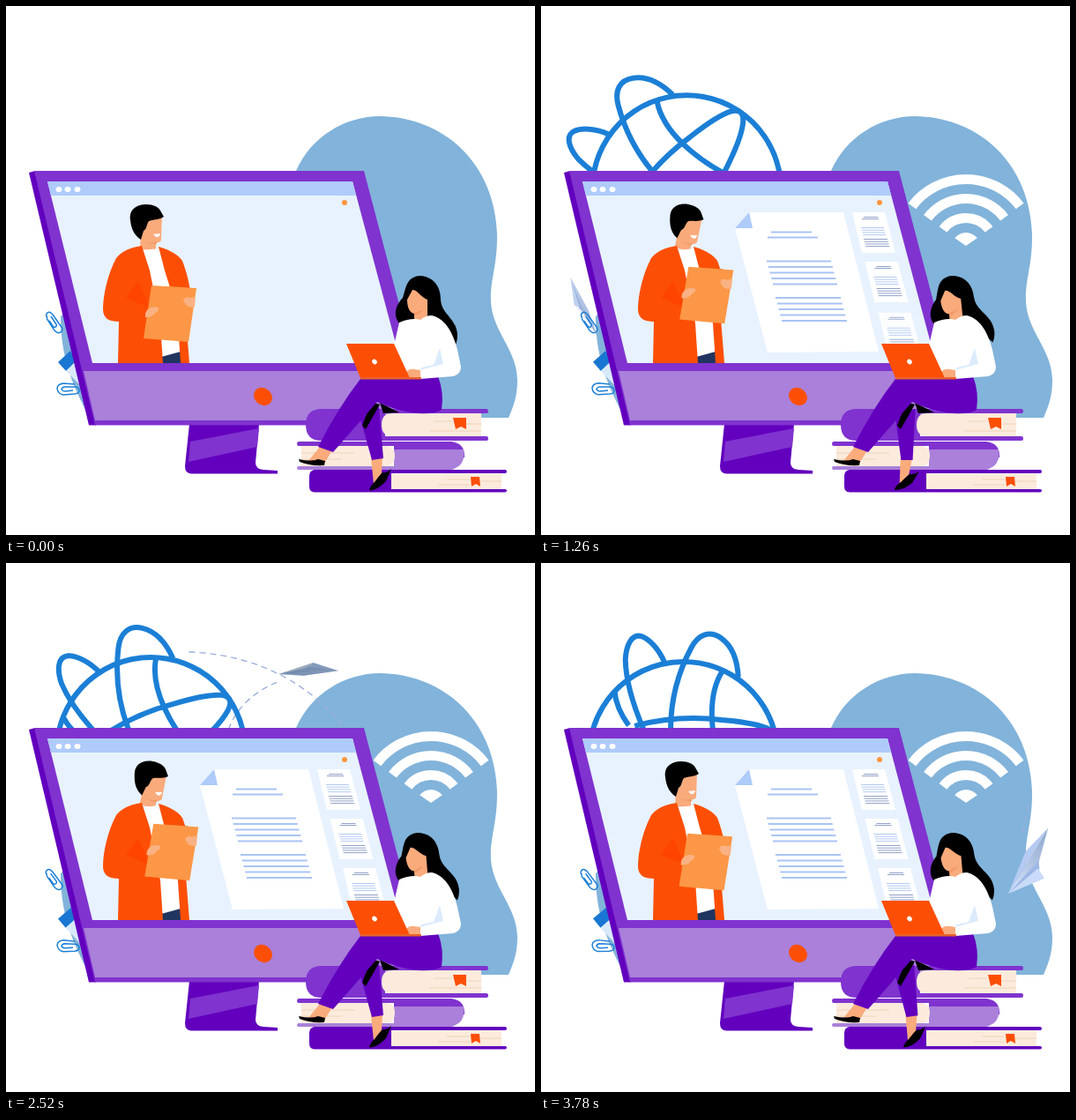
Animation of 600 by 600 pixels, one loop 3920 ms. Source, as an HTML page:

```html
<!DOCTYPE html>
<html lang="en">
<head>
<meta charset="utf-8">
<title>Online lesson</title>
<style>
  html, body { margin: 0; width: 100%; height: 100%; overflow: hidden; background: #fff; }
  svg { display: block; width: 100vw; height: 100vh; }
  .violet { fill: #8033cf; }
  .deep { fill: #6200be; }
  .lilac { fill: #aa80da; }
  .orange { fill: #fc4f05; }
  .skin { fill: #f9ab7c; }
  .cream { fill: #fcebdc; }
  .white { fill: #fff; }
  .pale { fill: #e8f2fe; }
  .line { fill: none; stroke: #1b7fd6; }
</style>
</head>
<body>
<svg viewBox="0 0 600 600">
  <defs>
    <clipPath id="sky"><rect width="600" height="188"/></clipPath>
    <clipPath id="glass"><path d="M51 215H397L448 405H98Z"/></clipPath>
    <linearGradient id="wing" x1="0" x2="1">
      <stop offset="0" stop-color="#8ba5cb"/><stop offset="1" stop-color="#d6e4fb"/>
    </linearGradient>
  </defs>

  <path fill="#82b3da" d="M329 187C346 148 385 125 424 125C500 126 556 182 557 262C557 296 549 310 550 336C552 370 580 390 580 425C580 445 574 457 570 467H95C75 430 62 398 62 352L120 300L329 300Z"/>

  <path id="trail" fill="none" stroke="#9dafdc" stroke-width="1.4" d="M62 362C30 310 12 260 12 218C12 180 35 145 62 133C90 118 150 100 210 101C290 105 350 140 390 195C410 230 240 260 252 190C262 160 290 138 325 130C350 122 375 122 400 122C470 122 530 140 552 172C566 195 562 225 557 247C552 285 540 340 530 375"/>
  <g id="plane">
    <path fill="#b4caf2" d="M0 0L-87 0L-51 8Z"/>
    <path fill="url(#wing)" d="M0 0L-87 0L-42 -13Z"/>
    <path fill="#9db7e6" d="M0 0L-50 -10L-42 -16Z"/>
    <path fill="#c9dbf9" d="M0 0L-42 -14L-36 -26Z"/>
    <path id="shade" fill="#56708f" d="M0 0L-36 -26L-87 0L-51 8Z"/>
  </g>

  <g clip-path="url(#sky)">
    <g id="globe" class="line" stroke-width="6">
      <circle cx="165" cy="211.500" r="107"/>
      <path d="M172 103C160 85 146 76 132 75C117 74 108 84 109 102C111 140 122 170 140 198"/>
      <path d="M92 132C78 122 63 118 54 120C43 123 44 137 52 152C66 174 88 193 112 210"/>
      <path d="M153 106C152 140 180 180 226 215"/>
      <path d="M100 211C125 185 150 168 181 154C205 142 222 136 233 135C254 134 247 158 206 207"/>
      <path d="M60 189Q72 205 94 214"/>
    </g>
  </g>

  <g id="clipA"><path class="line" stroke-width="1.5" d="M46 354L55 368Q60 373 63 369Q65 366 62 363L53 350Q49 345 46 349Q45 351 47 354M51 352L57 361Q58 363 56 364Q54 365 53 363L49 357"/></g>
  <g id="clipB"><path class="line" stroke-width="1.5" d="M78 429L65 428Q58 429 58 434Q59 440 65 441L78 440Q84 439 83 435Q82 432 78 432L66 432Q63 433 63 435Q64 437 67 437L76 436"/></g>
  <g id="box">
    <path fill="#1976d2" d="M59 404L73 391L80 404L68 414Z"/>
    <path fill="#d9eafb" d="M68 414L78 404L86 432Z"/>
  </g>

  <g id="wifi" fill="none" stroke="#fff" stroke-width="11"></g>

  <!-- monitor -->
  <path class="deep" d="M208 474L203 522Q203 530 210 530.500H308V527L292 526Q283 525 283 518L287 474Z"/>
  <path class="violet" d="M209 494L287 479L285 500L207 517Z"/>
  <path class="deep" d="M26 189L33 187L102 475.500H94Z"/>
  <path class="violet" d="M32 187H406L482 475.500H101Z"/>
  <path class="lilac" d="M88 414H461L475 470H101Z"/>
  <path class="pale" d="M47 199H393L448 405H98Z"/>
  <path fill="#aecbfa" d="M47 199H393L397 215H51Z"/>
  <g class="white">
    <ellipse cx="60" cy="208" rx="3.5" ry="3"/><ellipse cx="70" cy="208" rx="3.5" ry="3"/><ellipse cx="81" cy="208" rx="3.5" ry="3"/>
  </g>
  <circle cx="384" cy="223" r="3" fill="#fb953e"/>
  <ellipse class="orange" cx="291.5" cy="443" rx="11" ry="9.5" transform="rotate(40 291.5 443)"/>

  <g clip-path="url(#glass)">
    <g id="sheet">
      <path class="white" d="M220 252L236 234H343L383 392L257 393Z"/>
      <path fill="#aecbfa" d="M220 252L236 234L240 252Z"/>
      <path id="text" fill="none" stroke="#a9c4f3" stroke-width="2"/>
    </g>
    <g id="thumbs"></g>
  </g>

  <!-- teacher -->
  <g id="man">
    <g id="manHead">
      <path class="skin" d="M154 238H177L176 266Q174 269 170 268V277L152 276Z"/>
      <path fill="#f39a68" d="M158 267Q165 270 171 267V270Q164 271 158 267Z"/>
      <path d="M141 243C139 232 147 225 159 225C167 225 173 228 175 232L179 239C173 243 166 242 162 244C159 248 160 253 156 255L153 265C145 260 142 252 141 243Z"/>
      <path class="white" d="M167 259L175 258Q174 263 170 262Z"/>
    </g>
    <path class="white" d="M156 277L174 275L190 320L198 398L176 398L160 330Z"/>
    <path fill="#20355f" d="M176 398L198 392L199 405H177Z"/>
    <path class="orange" d="M154 272C138 274 130 280 125 286C115 305 110 328 110 344C110 355 118 358 128 358L127 405H178L175 360L163 300Z"/>
    <path class="orange" d="M173 273C187 277 196 283 200 289C205 302 209 318 209 327L204 355L208 405H198L194 345L180 300Z"/>
    <path fill="#ff4400" d="M150 312L136 331L162 342L158 330Z"/>
    <g id="board">
      <path fill="#d9722b" d="M178 318L204 319L203 321H178Z"/>
      <path fill="#fb9746" d="M165 317L216 320L207 381L156 377Z"/>
      <path fill="#fab183" d="M158 349C160 342 167 340 173 342Q174 346 169 348Q167 353 158 353Z"/>
      <path fill="#fab183" d="M201 334Q203 329 209 331L215 330L214 341Q208 343 204 339Z"/>
    </g>
  </g>

  <!-- books -->
  <path class="violet" d="M358 457H545Q547 457 547 460Q547 462 545 462H430V488H545Q547 488 547 491Q547 493 545 493H358Q340 493 340 475Q340 457 358 457Z"/>
  <path class="cream" d="M438 462H539V488H438Q426 488 426 475Q426 462 438 462Z"/>
  <path class="orange" d="M507 467H522V480L516 477L510 480Z"/>
  <path fill="none" stroke="#efd3ba" d="M485 471H506M522 474H539M480 482H539"/>
  <path class="violet" d="M332 494H505Q520 496 520 510V512H440V499H332Q330 499 330 496.500Q330 494 332 494Z"/>
  <path class="lilac" d="M440 503H519Q522 522 505 526H332Q330 526 330 524Q330 522 332 522H440Z"/>
  <path class="cream" d="M335 499H432Q441 500 441 510.500Q441 521 432 522H335Z"/>
  <path fill="none" stroke="#efd3ba" d="M335 507H395M335 514H380"/>
  <path class="deep" d="M350 526H566Q568 526 568 528Q568 530 566 530H437V548H566Q568 548 568 549.500Q568 551.500 566 551.500H350Q344 551 344 545V533Q344 527 350 526Z"/>
  <path class="cream" d="M437 530.500H562V548H437Z"/>
  <path class="orange" d="M527 534H537L538 545L533 542L528 545Z"/>
  <path fill="none" stroke="#efd3ba" d="M500 537H526M538 539H562M490 543H526"/>

  <!-- student -->
  <g id="shin">
    <path class="skin" d="M414 512H427L426 530L417 542Z"/>
    <path d="M437 525L431 539Q422 549 412 549.500Q413 544 418 540Q423 533 427 529Q432 530 437 525Z"/>
    <path class="deep" d="M402 468L423 455L428 513L415 515Z"/>
  </g>
  <path d="M404 476L414 449L424 452L408 480ZM424 450L446 461L428 462Z"/>
  <path class="skin" d="M356 500L370 504L362 517L343 516Z"/>
  <path d="M332 514Q346 517 354 514L362 516L361 521Q345 522 333 517Z"/>
  <path class="deep" d="M402 423L490 420Q497 438 494 458Q488 463 466 462Q442 459 421 449L371 506L354 500Q377 455 402 423Z"/>
  <g id="womanHead">
    <path d="M470 306C484 307 493 317 493 333C494 350 511 354 512 373Q512 381 509 386L488 364L447 361C438 352 442 339 450 331C454 319 454 307 470 306Z"/>
    <path class="skin" d="M461 322C467 322 470 330 478 333L478 356L463 357V349C457 348 455 340 455 333Z"/>
    <path fill="#f39a68" d="M463 348L474 344Q469 350 463 351Z"/>
  </g>
  <path class="white" d="M446 359C455 355 464 354 470 356Q476 351 483 351C500 355 508 374 512 390L516 409Q516 418 507 420L470 423L452 422L440 385Z"/>
  <path fill="#dcebfc" d="M492 388L485 407L471 410L470 413L496 406Z"/>
  <path class="skin" d="M453 416Q457 411 463 412L470 413V421H455Z"/>
  <path class="orange" d="M386 383H440L458 422H402Z"/>
  <path fill="#e8632a" d="M402 421H471V423.500H402Z"/>
  <ellipse class="white" cx="418" cy="403.500" rx="3" ry="2.500" transform="rotate(40 418 403.500)"/>
</svg>

<script>
const STEP = 140, COUNT = 28;
const $ = id => document.getElementById(id);
const clamp = v => Math.max(0, Math.min(1, v));
const set = (el, name, value) => el.setAttribute(name, value);
const turn = (id, deg, x, y, dx = 0, dy = 0) =>
  set($(id), 'transform', `translate(${dx} ${dy}) rotate(${deg} ${x} ${y})`);

function add(parent, tag, attrs) {
  const el = document.createElementNS('http://www.w3.org/2000/svg', tag);
  for (const name in attrs) set(el, name, attrs[name]);
  parent.appendChild(el);
  return el;
}

// Linear interpolation through [step, value] pairs.
function at(keys, k) {
  if (k <= keys[0][0]) return keys[0][1];
  for (let i = 1; i < keys.length; i++) {
    const [a, u] = keys[i - 1], [b, v] = keys[i];
    if (k <= b) return u + (v - u) * (k - a) / (b - a);
  }
  return keys[keys.length - 1][1];
}

// Horizontal lines that lean with the screen.
function rows(x, y, width, gap, n) {
  let d = '';
  for (let i = 0; i < n; i++) d += `M${x + i * gap * 0.27} ${y + i * gap}h${width}`;
  return d;
}

set($('text'), 'd', 'M261 256.500h46M257 262.500h57' + rows(256, 289.500, 73, 6.500, 5) + rows(266, 331, 74, 6.500, 5));

const thumbs = [0, 1, 2].map(i => {
  const holder = add($('thumbs'), 'g', {});
  const g = add(holder, 'g', { transform: `translate(${i * 14.5} ${i * 56})`, fill: 'none', 'stroke-width': 0.8 });
  add(g, 'path', { class: 'white', d: 'M353 234H390L402 280H364Z' });
  add(g, 'path', { stroke: '#7488b8', d: 'M366 239.500h16M364 241.500h19' + rows(366, 264.500, 27, 2.700, 4) });
  add(g, 'path', { stroke: '#9dbaf0', d: rows(363, 251.500, 26, 2.700, 4) });
  return holder;
});

const SIN = Math.sin(53 * Math.PI / 180), COS = Math.cos(53 * Math.PI / 180);
const dot = add($('wifi'), 'path', {
  fill: '#fff', stroke: 'none', d: `M0 -1L${-16 * SIN} ${-16 * COS}A16 16 0 0 1 ${16 * SIN} ${-16 * COS}Z`
});
const arcs = [32.5, 54.5, 76.5].map(r => add($('wifi'), 'path', {
  d: `M${-r * SIN} ${-r * COS}A${r} ${r} 0 0 1 ${r * SIN} ${-r * COS}`
}));

const KEYS = {
  nose: [[7, 0], [9, 60], [14, 325], [18, 930], [21, 1185], [27, 1316]],
  tail: [[14, 0], [18, 410], [21, 942], [24, 1250]],
  length: [[14, 0.85], [18, 0.78], [21, 0.9], [27, 1]],
  roll: [[9, 0.35], [18, 0.42], [21, 0.9], [27, 1]],
  shade: [[9, 0.1], [14, 0.3], [18, 0.6], [21, 0.15], [27, 0]],
  rise: [[0, 130], [1, 90], [2, 40], [3, 10], [4, 0]],
  sheet: [[1, 175], [2, 158], [4, 100], [6, 32], [8, 0]],
  board: [[0, 0], [4, -14.5], [9, -21], [21, -21], [27, -10]],
  manHead: [[4, 0], [9, 10], [18, 9], [21, 0]],
  womanHead: [[0, 0], [4, -3], [9, -6], [14, -6], [21, -4], [27, -5]],
  shin: [[0, 0], [4, 3], [9, 8], [14, 2], [18, 0], [21, 0], [27, 0.7]]
};

const trail = $('trail'), total = trail.getTotalLength(), DASH = 12;

function flight(k) {
  const visible = k >= 8;
  set($('plane'), 'visibility', visible ? 'visible' : 'hidden');
  set(trail, 'visibility', visible ? 'visible' : 'hidden');
  if (!visible) return;
  const nose = Math.min(total, at(KEYS.nose, k) * total / 1316);
  const a = trail.getPointAtLength(Math.max(0, nose - 16));
  const b = trail.getPointAtLength(nose);
  const deg = Math.atan2(b.y - a.y, b.x - a.x) * 180 / Math.PI;
  const lean = at([[21, 0], [27, 16]], k);
  set($('plane'), 'transform',
    `translate(${b.x} ${b.y}) rotate(${deg + lean}) scale(${at(KEYS.length, k)} ${at(KEYS.roll, k)})`);
  set($('shade'), 'opacity', at(KEYS.shade, k));
  const from = Math.round(at(KEYS.tail, k) / DASH) * DASH;
  const n = Math.max(0, Math.floor((nose - 60 - from) / DASH));
  set(trail, 'stroke-dasharray', `0 ${from} ` + '7 5 '.repeat(n) + '0 3000');
}

function signal(k) {
  const d = clamp((k - 1) / 2);
  set(dot, 'transform', `translate(482 273) scale(${d})`);
  arcs.forEach((arc, i) => {
    const s = clamp((k - [1.6, 2.8, 3.4][i]) / 4);
    set(arc, 'transform', `translate(482 ${273 - (1 - s) * [12, 28, 39][i]}) scale(${s})`);
    set(arc, 'opacity', clamp(s * 2));
  });
}

function draw(k) {
  flight(k);
  signal(k);
  turn('globe', 2.4 * (k - 14), 150, 209, 0, at(KEYS.rise, k));

  const drop = at(KEYS.sheet, k);
  set($('sheet'), 'transform', `translate(${drop * 0.25} ${drop})`);
  set($('sheet'), 'opacity', clamp((k - 1) / 5));
  set($('text'), 'opacity', clamp((k - 4) / 4));
  thumbs.forEach((el, i) => {
    const p = clamp((k - 4 - i * 1.2) / 3.2), off = 50 * (1 - p) ** 2;
    set(el, 'transform', `translate(${off * 0.25} ${off})`);
    set(el, 'opacity', p);
  });

  const lift = at(KEYS.board, k);
  turn('board', -lift / 21, 186, 349, -lift / 12, lift);
  turn('manHead', at(KEYS.manHead, k), 163, 272);
  turn('womanHead', at(KEYS.womanHead, k), 468, 350);
  turn('shin', at(KEYS.shin, k), 411, 468);

  const sway = Math.sin(k / COUNT * Math.PI * 6);
  turn('clipA', sway * 5, 55, 360);
  turn('clipB', -sway * 5, 72, 435);
  turn('box', -sway * 5, 74, 404);
}

const start = performance.now();
function tick() {
  draw(Math.floor((performance.now() - start) / STEP) % COUNT);
  requestAnimationFrame(tick);
}
tick();
</script>
</body>
</html>
```
